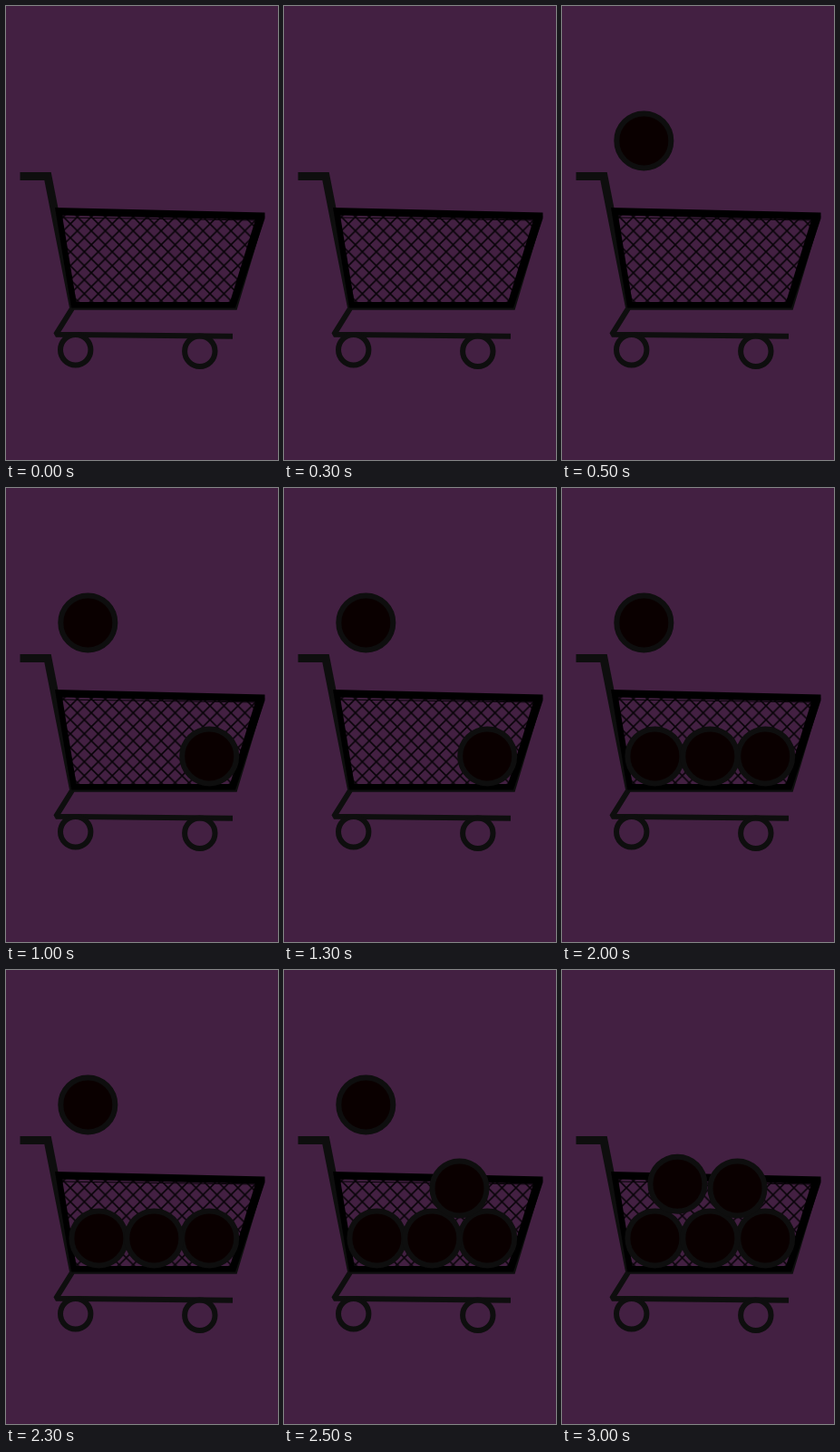
An HTML page that plays this animation: 300 px wide and 500 px high, repeating every 3.5 s.

```html
<!DOCTYPE html>
<html lang="en">
<head>
<meta charset="utf-8">
<title>Filling cart</title>
<style>
  html, body { margin: 0; width: 100%; height: 100%; overflow: hidden; background: #432042; }
  svg { display: block; width: 100vw; height: 100vh; }
  .ball { fill: #0a0000; stroke: #0e0e0e; stroke-width: 6; opacity: 0; animation: 3.5s step-end infinite; }
  .next { animation-name: next; }
  .b1 { animation-name: b1; }
  .b2 { animation-name: b2; }
  .b3 { animation-name: b3; }
  .b4 { animation-name: b4; }
  .b5 { animation-name: b5; }
  @keyframes next { 0%, 85.7142% { opacity: 0 } 14.2857% { opacity: 1 } 100% { opacity: 0 } }
  @keyframes b1 { 0% { opacity: 0 } 28.5714%, 100% { opacity: 1 } }
  @keyframes b2 { 0% { opacity: 0 } 42.8571%, 100% { opacity: 1 } }
  @keyframes b3 { 0% { opacity: 0 } 57.1428%, 100% { opacity: 1 } }
  @keyframes b4 { 0% { opacity: 0 } 71.4285%, 100% { opacity: 1 } }
  @keyframes b5 { 0% { opacity: 0 } 85.7142%, 100% { opacity: 1 } }
</style>
</head>
<body>
<svg viewBox="0 0 300 500" preserveAspectRatio="none">
  <defs>
    <pattern id="mesh" x="63.3" y="232.2" width="15.4" height="15.4" patternUnits="userSpaceOnUse">
      <path d="M-2 -2L17.4 17.4M17.4 -2L-2 17.4" stroke="#080308" stroke-width="1.6"/>
    </pattern>
  </defs>
  <rect width="300" height="500" fill="#432042"/>

  <!-- basket -->
  <path d="M57 226L280 232L250 330H73Z" fill="url(#mesh)"/>
  <path d="M61 233L276 236" stroke="#080308" stroke-width="1.2"/>
  <g fill="none" stroke="#0e0e0e">
    <path d="M15.5 187.5H46L74.5 332" stroke-width="9"/>
    <path d="M70 333.3H253.5L284 231" stroke-width="3"/>
    <path d="M73 333L55 361.8L250 363.7" stroke-width="6" stroke-linejoin="bevel"/>
    <circle cx="76.7" cy="378.8" r="16.7" stroke-width="6"/>
    <circle cx="213.8" cy="380.2" r="16.7" stroke-width="6"/>
  </g>
  <path fill="#000" fill-rule="evenodd" d="M54 222L285.5 227.5V234L253 332.5H72ZM62 230.5L77.5 326H247L275 235.5Z"/>

  <!-- goods -->
  <circle class="ball next" cx="90.3" cy="148.4" r="30"/>
  <circle class="ball b1" cx="224.2" cy="295.4" r="30"/>
  <circle class="ball b2" cx="102.4" cy="295.4" r="30"/>
  <circle class="ball b3" cx="163.3" cy="295.4" r="30"/>
  <circle class="ball b4" cx="193.5" cy="240.4" r="30"/>
  <circle class="ball b5" cx="127.4" cy="235.7" r="30"/>
</svg>
</body>
</html>
```
